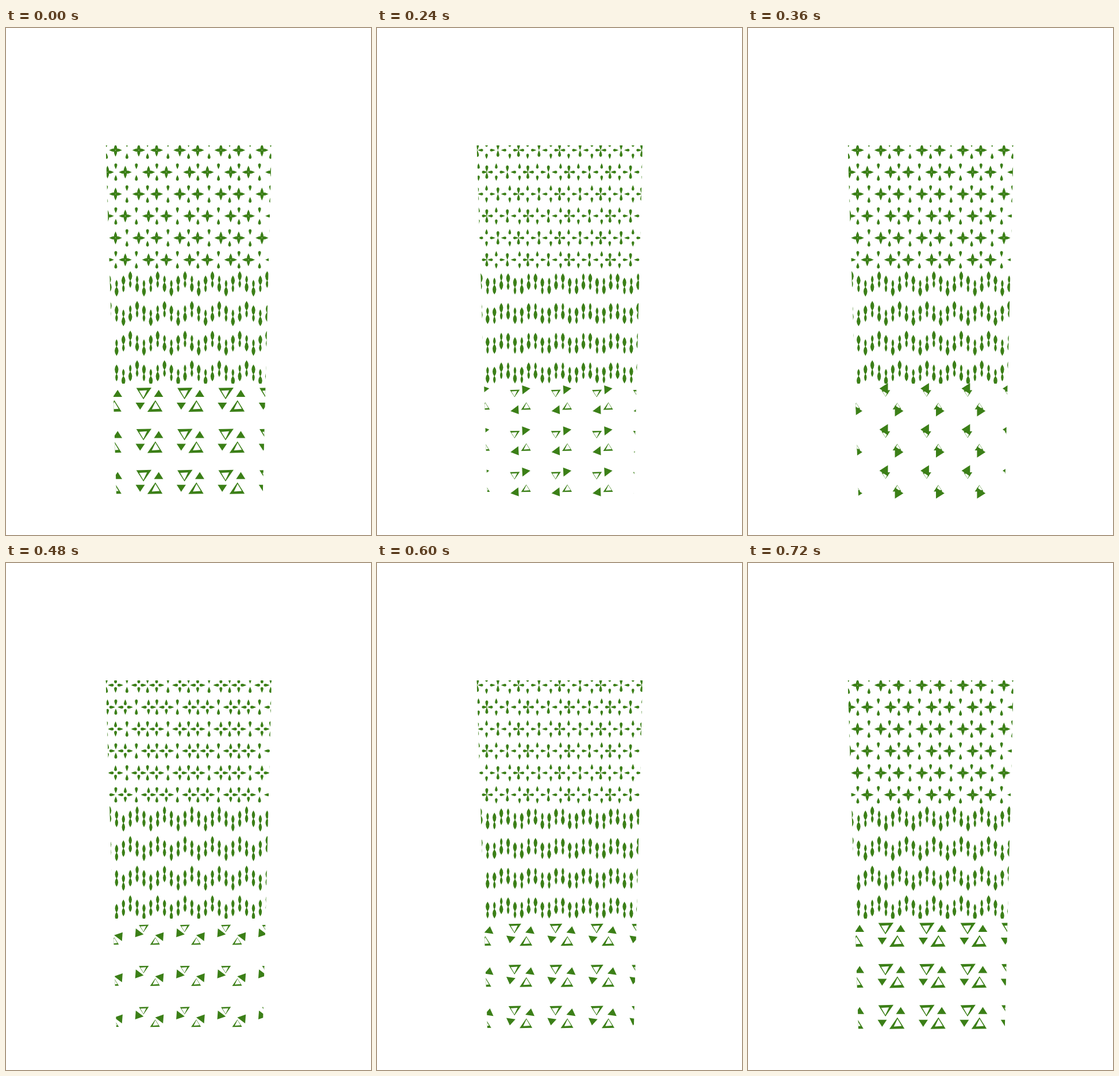
Recreate the animation shown at these times as an HTML page with a canvas. Size 635 by 881 pixels, loop 750 ms.

```html
<!DOCTYPE html>
<html lang="en">
<head>
<meta charset="utf-8">
<title>Leaf pattern</title>
<style>
  html, body { margin: 0; width: 100%; height: 100%; overflow: hidden; background: #fff; }
  canvas { display: block; }
</style>
</head>
<body>
<canvas id="stage" width="635" height="881"></canvas>
<script>
const ctx = document.getElementById('stage').getContext('2d');
const GREEN = '#3b7f17';
const STEP = 30, LOOP = 750, CYCLE = 720;
const CELL = 71.43;
const TAU = Math.PI * 2, LAG = Math.PI / 6;

function poly(points, color = GREEN, scale = 1) {
  ctx.fillStyle = color;
  ctx.beginPath();
  points.forEach(([x, y]) => ctx.lineTo(x * scale, y * scale));
  ctx.fill();
}

function clip(points, draw) {
  ctx.save();
  ctx.beginPath();
  points.forEach(([x, y]) => ctx.lineTo(x, y));
  ctx.clip();
  draw();
  ctx.restore();
}

// Drop from its round end to its tip, both measured from (x, y) along the angle.
function petal(x, y, angle, from, to, w) {
  const len = to - from;
  ctx.save();
  ctx.translate(x, y);
  ctx.rotate(angle);
  ctx.fillStyle = GREEN;
  ctx.beginPath();
  ctx.moveTo(from, 0);
  ctx.bezierCurveTo(from + len * 0.1, w * 0.85, from + len * 0.5, w * 0.45, to, 0);
  ctx.bezierCurveTo(from + len * 0.5, -w * 0.45, from + len * 0.1, -w * 0.85, from, 0);
  ctx.fill();
  ctx.restore();
}

function leaf(x, top, bottom, w) {
  const mid = (top + bottom) / 2;
  ctx.fillStyle = GREEN;
  ctx.beginPath();
  ctx.moveTo(x, top);
  ctx.quadraticCurveTo(x + w, mid, x, bottom);
  ctx.quadraticCurveTo(x - w, mid, x, top);
  ctx.fill();
}

function flowers(phase) {
  const c = Math.cos(phase * 2 - LAG);
  const out = 8.2 - 2.8 * c, outHalf = 5.1 + 0.4 * c;
  const inn = 8 + 2.5 * c, innHalf = 5.4 - 0.45 * c;
  for (let row = 0; row < 6; row++) {
    const y = 212.3 + row * 38.1, odd = row % 2;
    for (let n = -1; n < 5; n++) {
      const x = n * CELL;
      for (const fx of odd ? [207.5, 248] : [190.6, 231]) {
        for (let q = 0; q < 4; q++) {
          petal(x + fx, y, q * Math.PI / 2, out - outHalf, out + outHalf, 5 + 0.5 * c);
        }
      }
      for (const dx of odd ? [191, 226.8] : [210.4, 246.2]) {
        for (const side of [1, -1]) {
          petal(x + dx, y, side * Math.PI / 2, inn + innHalf, inn - innHalf, 5);
        }
      }
    }
  }
}

function leaves(phase) {
  for (let row = 0; row < 4; row++) {
    const a = phase + (row % 2) * Math.PI;
    const sway = 4.3 * Math.cos(a - LAG), swell = Math.cos(a + LAG);
    for (let k = -4; k < 22; k++) {
      const m = (k + 4) % 4;
      const sign = m === 0 || m === 3 ? 1 : -1;
      const y = 444.6 + row * 51.6 + (m < 2 ? -3.75 : 3.75) - sign * sway;
      const x = 216.2 + k * CELL / 6;
      const s = sign * swell;
      const joint = y + 2.2 * s;
      leaf(x, y - 14.6, joint + 0.8, 5.6 + 1.2 * s);
      leaf(x, joint - 0.8, y + 14.6, 5.6 - 1.2 * s);
    }
  }
}

function pinwheel(cx, cy, turn, shrink, grow) {
  for (const half of [0, Math.PI]) {
    ctx.save();
    ctx.translate(cx, cy);
    ctx.rotate(half);
    ctx.translate(-9.8, -11);
    poly([[-13, -9.4], [13.4, -10], [-0.6, 10.2]], GREEN, 1 - 0.43 * shrink);
    poly([[-8, -4.7], [5.6, -5.6], [-0.7, 7.6]], '#fff', 1 - 0.32 * shrink);
    ctx.restore();
  }
  for (const half of [0, Math.PI]) {
    ctx.save();
    ctx.translate(cx, cy);
    ctx.rotate(half - turn);
    poly([[8, -5], [24, -5], [16.2, -17.2]], GREEN, 1 + 0.21 * grow);
    ctx.restore();
  }
}

function pinwheels(u) {
  const ease = v => 0.5 * Math.pow(2 * v, 2.2);
  const turn = Math.PI * (u < 0.5 ? ease(u) : 1 - ease(1 - u));
  const swing = Math.max(0, Math.sin(Math.PI * u));
  for (let row = 0; row < 3; row++) {
    for (let n = -1; n < 4; n++) {
      pinwheel(249.5 + n * CELL, 646 + row * 71.4, turn, swing ** 1.4, swing ** 8);
    }
  }
}

function draw(ms) {
  const t = Math.floor((ms % LOOP) / STEP) * STEP;
  const u = Math.min(t / CYCLE, 1), phase = u * TAU;
  ctx.fillStyle = '#fff';
  ctx.fillRect(0, 0, 635, 881);
  clip([[173.5, 204], [462, 204], [446.5, 820], [192.3, 820]], () => {
    flowers(phase);
    clip([[0, 418], [635, 418], [635, 618], [0, 618]], () => leaves(phase));
    pinwheels(u);
  });
}

const start = performance.now();
function tick() {
  draw(performance.now() - start);
  requestAnimationFrame(tick);
}
tick();
</script>
</body>
</html>
```
